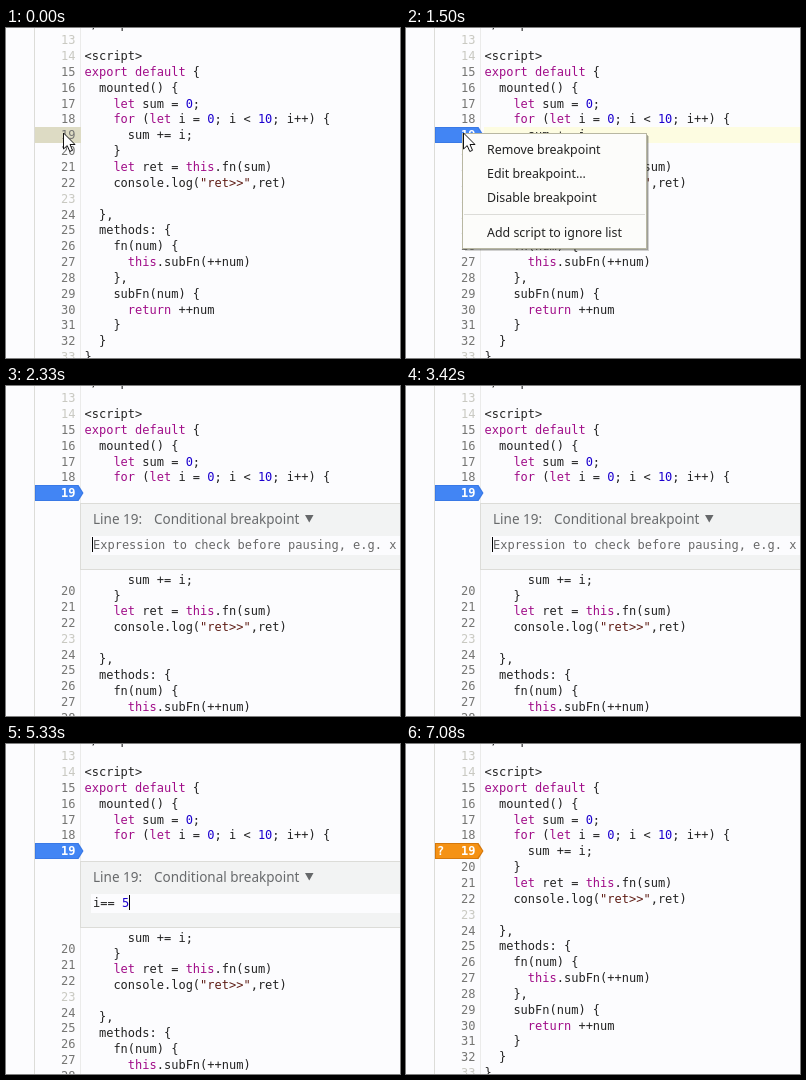
Recreate the animation shown at these times as an HTML page with a canvas. Size 394 by 330 pixels, loop 8.83 s.

```html
<!DOCTYPE html>
<html lang="en">
<head>
<meta charset="utf-8">
<title>Conditional breakpoint</title>
<style>
html, body { margin: 0; width: 100%; height: 100%; overflow: hidden; background: #fcfcfe; }
canvas { display: block; width: 394px; height: 330px; }
</style>
</head>
<body>
<canvas id="stage"></canvas>
<script>
const W = 394, H = 330, LOOP = 8830;
const MONO = '12px "DejaVu Sans Mono", monospace';
const SANS = '"Noto Sans", "Open Sans", sans-serif';
const INK = '#222222', PAPER = '#fcfcfe', PANEL = '#f2f3f3', RULE = '#dcdcd8', HOVER = '#dddbc4';
const FIRST_LINE = 12, BREAK_LINE = 19, ROW = 15.85;
const CODE = [
  '</template>',
  '',
  '<script>',
  'export default {',
  '  mounted() {',
  '    let sum = 0;',
  '    for (let i = 0; i < 10; i++) {',
  '      sum += i;',
  '    }',
  '    let ret = this.fn(sum)',
  '    console.log("ret>>",ret)',
  '',
  '  },',
  '  methods: {',
  '    fn(num) {',
  '      this.subFn(++num)',
  '    },',
  '    subFn(num) {',
  '      return ++num',
  '    }',
  '  }',
  '}'
];
const DIM_LINES = [12, 13, 14, 23, 33];
const KEYWORD = /^(export|default|let|for|this|return)$/;

// Times in milliseconds
const BREAK_AT = 750, FADE = 940, MENU_AT = 1420;
const MOVE_FROM = 1580, MOVE_TO = 2040;
const EDITOR_AT = 2250, CLOSE_AT = 7000, CONDITION_AT = 7080;
const TYPING = [[4000, 'i'], [4830, 'i='], [4920, 'i=='], [5170, 'i== '], [5330, 'i== 5']];
const CARET_OFF = [[2750, 3420], [4000, 4580], [5920, 6500]];

const canvas = document.getElementById('stage');
const ctx = canvas.getContext('2d');
const scale = window.devicePixelRatio || 1;
canvas.width = W * scale;
canvas.height = H * scale;

const clamp = x => Math.max(0, Math.min(1, x));
const rowY = line => 28 + (line - 14) * ROW;

function box(x, y, w, h, color) {
  ctx.fillStyle = color;
  ctx.fillRect(x, y, w, h);
}

function polygon(points, color) {
  ctx.beginPath();
  points.forEach(([x, y]) => ctx.lineTo(x, y));
  ctx.closePath();
  ctx.fillStyle = color;
  ctx.fill();
}

function label(text, x, y, font, color, align = 'left') {
  ctx.font = font;
  ctx.textAlign = align;
  ctx.fillStyle = color;
  ctx.fillText(text, x, y);
}

function tokenColor(token) {
  if (KEYWORD.test(token)) return '#a00c88';
  if (/^\d/.test(token)) return '#1c00cf';
  if (token[0] === '"') return '#5e1c14';
  return INK;
}

function codeText(text, x, y) {
  ctx.font = MONO;
  const advance = ctx.measureText('0').width;
  for (const m of text.matchAll(/<\/?\w+>|"[^"]*"|\w+|[^\w\s"]/g)) {
    label(m[0], x + m.index * advance, y, MONO, tokenColor(m[0]));
  }
}

function marker(fill, edge) {
  const shape = (l, t, r, b) => [[l, t], [r - 5, t], [r, 107], [r - 5, b], [l, b]];
  polygon(shape(29, 99, 77.5, 115), edge);
  polygon(shape(30, 100, 76.3, 114), fill);
}

function lines(t, editing) {
  CODE.forEach((text, i) => {
    const line = FIRST_LINE + i, y = rowY(line);
    const codeY = Math.round(y + 4 + (editing && line >= BREAK_LINE ? 86.5 : 0));
    const numberY = Math.round(y + 4 + (editing && line > BREAK_LINE ? 82 : 0));
    codeText(text, 78.5, codeY);
    if (line === BREAK_LINE && t >= BREAK_AT) {
      label(line, 69.5, numberY, 'bold ' + MONO, '#ffffff', 'right');
    } else {
      label(line, 69.5, numberY, MONO, DIM_LINES.includes(line) ? '#c9c9c2' : '#757573', 'right');
    }
  });
}

function gutter(t) {
  box(28, 0, 1, H, RULE);
  box(74, 0, 1, H, '#ebebea');
  if (t < BREAK_AT) box(29, 99, 46, 16, HOVER);
  else if (t < CONDITION_AT) marker('#4285f4', '#3979e6');
  else marker('#f59215', '#d5780c');
  if (t >= CONDITION_AT) label('?', 31, 111, 'bold ' + MONO, '#ffffff');
}

function flash(t) {
  if (t < BREAK_AT || t >= EDITOR_AT) return;
  const alpha = 1 - clamp((t - BREAK_AT) / FADE);
  box(78, 99, W - 78, 16, `rgba(255, 250, 110, ${alpha})`);
  if (t < MENU_AT) box(78, 99, 1, 15, '#000000');
}

function menu(pointerY) {
  box(59, 108, 184, 115, 'rgba(80, 80, 70, 0.25)');
  box(58, 107, 184, 115, 'rgba(80, 80, 70, 0.4)');
  box(56, 105, 185, 116, '#b8b7a2');
  box(57, 106, 183, 114, '#fcfcfa');
  const items = [
    ['Remove breakpoint', 121.5],
    ['Edit breakpoint...', 145.5],
    ['Disable breakpoint', 169.5],
    ['Add script to ignore list', 204.5]
  ];
  for (const [text, y] of items) {
    if (Math.abs(pointerY - y) < 12) box(58, y - 12, 181, 24, HOVER);
    label(text, 81, Math.round(y + 4.5), '12.4px ' + SANS, INK);
  }
  box(58, 186, 181, 1, RULE);
}

function editor(t) {
  box(74, 117, W - 74, 67, PANEL);
  box(74, 117, W - 74, 1, RULE);
  box(74, 183, W - 74, 1, RULE);
  box(74, 117, 1, 67, RULE);
  box(85, 150, W - 85, 19, PAPER);
  label('Line 19:', 87, 138, '13.5px ' + SANS, '#686a6c');
  label('Conditional breakpoint', 148, 138, '13.5px ' + SANS, '#686a6c');
  polygon([[299, 129], [307.5, 129], [303.25, 136.5]], '#66686a');

  const typed = TYPING.filter(([at]) => t >= at).map(step => step[1]).pop() || '';
  if (typed) codeText(typed, 87, 163);
  else label('Expression to check before pausing, e.g. x', 87, 163, MONO, '#686868');
  if (!CARET_OFF.some(([from, to]) => t >= from && t < to)) {
    ctx.font = MONO;
    box(Math.ceil(86 + ctx.measureText(typed).width), 151, 1, 15, '#000000');
  }
}

function pointer(x, y) {
  const arrow = [[0, 0], [0, 16], [3.7, 12.6], [6.3, 18.5], [9, 17.3], [6.5, 11.5], [11.5, 11.5]];
  polygon(arrow.map(([dx, dy]) => [x + dx, y + dy]), '#ffffff');
  ctx.strokeStyle = '#111111';
  ctx.lineWidth = 1;
  ctx.stroke();
}

function draw(t) {
  const editing = t >= EDITOR_AT && t < CLOSE_AT;
  const p = clamp((t - MOVE_FROM) / (MOVE_TO - MOVE_FROM));
  const ease = p * p * (3 - 2 * p);
  const x = 57.5 + 88.5 * ease, y = 105 + 44.5 * ease;

  ctx.setTransform(scale, 0, 0, scale, 0, 0);
  box(0, 0, W, H, PAPER);
  flash(t);
  gutter(t);
  lines(t, editing);
  if (editing) editor(t);
  if (t >= MENU_AT && t < EDITOR_AT) menu(y);
  if (t < EDITOR_AT) pointer(x, y);
}

const start = performance.now();
function tick() {
  draw((performance.now() - start) % LOOP);
  requestAnimationFrame(tick);
}
tick();
</script>
</body>
</html>
```
